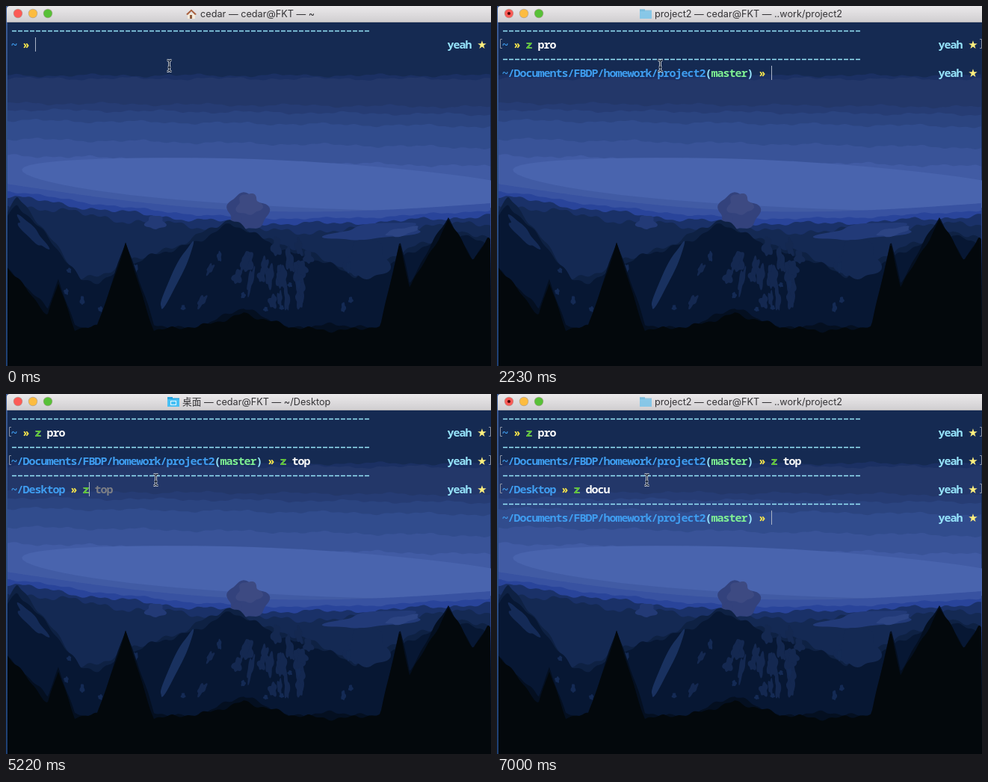
Recreate the animation shown at these times as an HTML page with a canvas. Size 649 by 482 pixels, loop 8 s.

```html
<!DOCTYPE html>
<html lang="en">
<head>
<meta charset="utf-8">
<title>Terminal directory jumping</title>
<style>
html, body { margin: 0; height: 100%; overflow: hidden; background: #03080c; }
canvas { display: block; }
</style>
</head>
<body>
<canvas id="stage" width="649" height="482"></canvas>
<script>
const LOOP = 8000, W = 649, H = 482, CELL = 8, LEFT = 7, ROW = 38;
const stage = document.getElementById('stage');
const wallpaper = new OffscreenCanvas(W, H);
let ctx = wallpaper.getContext('2d');

const BLUE = '#3f9df0', CYAN = '#97e5fc', YELLOW = '#fbe84c', GREEN = '#57c52d',
  MINT = '#7ff095', WHITE = '#fbfbfb', GRAY = '#7d7f85', STAR = '#fff07e';

// ---- drawing helpers -------------------------------------------------

function box(color, x, y, w, h) {
  ctx.fillStyle = color;
  ctx.fillRect(x, y, w, h);
}

function disc(color, x, y, r) {
  ctx.fillStyle = color;
  ctx.beginPath();
  ctx.arc(x, y, r, 0, 2 * Math.PI);
  ctx.fill();
}

function polygon(color, points) {
  ctx.fillStyle = color;
  ctx.beginPath();
  points.forEach(([x, y]) => ctx.lineTo(x, y));
  ctx.fill();
}

function gradient(height, from, to) {
  const g = ctx.createLinearGradient(0, 0, 0, height);
  g.addColorStop(0, from);
  g.addColorStop(1, to);
  return g;
}

// ---- wallpaper -------------------------------------------------------

let seed = 7;
function random(from, to) {
  seed = seed * 16807 % 2147483647;
  return from + (to - from) * seed / 2147483647;
}

const ripple = (x, phase) =>
  Math.sin(x * .05 + phase) + .7 * Math.sin(x * .13 + phase * 3) + .5 * Math.sin(x * .31 + phase * 5);

// Fills everything below the curve y = edge(x).
function below(color, edge) {
  const points = [[W, H], [0, H]];
  for (let x = 0; x <= W; x += 2) points.push([x, edge(x)]);
  polygon(color, points);
}

// A skyline of tent-shaped peaks, each given as [x, height, half width].
const skyline = (base, peaks, rough) => x =>
  base - Math.max(0, ...peaks.map(([px, h, w]) => h * (1 - Math.abs(x - px) / w))) + rough * ripple(x, base);

function blob(color, x, y, rx, ry, tilt = 0, rough = .12) {
  const points = [], phase = x + y;
  for (let a = 0; a < 2 * Math.PI; a += .1) {
    const r = 1 + rough * (Math.sin(3 * a + phase) + Math.sin(5 * a + 2 * phase));
    const u = rx * r * Math.cos(a), v = ry * r * Math.sin(a);
    points.push([x + u * Math.cos(tilt) - v * Math.sin(tilt), y + u * Math.sin(tilt) + v * Math.cos(tilt)]);
  }
  polygon(color, points);
}

function paintSky() {
  box('#152a52', 0, 0, W, H);
  const bands = [[93, '#1b3063'], [97, '#233769'], [130, '#263c74'], [139, '#2b4480'],
    [153, '#314c8d'], [178, '#395398'], [200, '#415ba4']];
  for (const [y, color] of bands)
    below(color, x => y + (y - 93) * .14 * x / W + 1.3 * ripple(x, y));
  blob('#4964ae', 370, 238, 345, 31, .05, .01);
}

function paintMountains() {
  const haze = [[238, '#3852a1'], [247, '#29449a'], [254, '#1a3168'], [264, '#142953']];
  haze.forEach(([y, color], i) =>
    below(color, x => y + 23 * Math.sin(Math.PI * x / W) + 26 * x / W + i * ripple(x, y)));
  blob('#233a76', 200, 290, 13, 9);
  blob('#223a78', 495, 302, 60, 10, -.1);
  blob('#2c4483', 530, 302, 22, 5, -.2);
  blob('#33427c', 322, 277, 27, 24, .2);
  blob('#33427c', 305, 298, 8, 20, .3);
  blob('#3d4a82', 325, 266, 16, 14);

  const valley = [[15, 103, 85], [300, 72, 175], [610, 63, 150]];
  below('#0e2143', skyline(361, valley, 3));
  below('#071733', skyline(366, valley, 3));
  blob('#142a56', 34, 303, 7, 28, -.75);
  blob('#142953', 483, 340, 28, 26);

  // Snow streaks lean away from the summit.
  blob('#19315f', 228, 361, 6, 49, .45, .05);
  for (let i = 0; i < 24; i++) {
    const x = random(262, 405), y = random(318, 402);
    blob('#142850', x, y, random(3, 8), random(7, 19), (365 - x) / 180, .16);
  }
  for (let i = 0; i < 16; i++) blob('#142a54', random(80, 500), random(335, 412), 3, random(3, 7));

  const trees = [[0, 82, 75], [70, 62, 22], [160, 114, 38], [318, 23, 60],
    [527, 115, 26], [592, 146, 85], [645, 120, 80]];
  below('#040f20', skyline(429, trees, 2.5));
  below('#03080c', skyline(432, trees, 2.5));
}

function paintWallpaper() {
  paintSky();
  paintMountains();
  box(gradient(H, '#3a5a94', '#1d3f72'), 0, 0, 2, H);
}

// ---- title bar -------------------------------------------------------

const USER = 'cedar@FKT';
const home = { icon: 'home', x: 241, text: `cedar — ${USER} — ~` };
const project = { icon: 'folder', x: 191, text: `project2 — ${USER} — ..work/project2` };
const desktop = { icon: 'desktop', x: 216, text: `桌面 — ${USER} — ~/Desktop` };

// The window counts as busy from `at` until `idle`.
const titles = [
  { at: 0, idle: 0, ...home },
  { at: 1930, idle: 0, ...home, x: 197, text: `cedar — ${USER} — ..work/project2` },
  { at: 2080, idle: 2370, ...project },
  { at: 4320, idle: 4470, ...desktop },
  { at: 6850, idle: LOOP, ...project }
];

function drawIcon(icon, x) {
  if (icon === 'home') {
    box('#f3eadb', x + 2, 10, 10, 7);
    box('#8d5b3d', x + 5, 12, 3, 5);
    polygon('#a85f3d', [[x, 11], [x + 7, 4.5], [x + 14, 11], [x + 12, 12], [x + 7, 7], [x + 2, 12]]);
    return;
  }
  const bright = icon === 'desktop';
  box(bright ? '#26a4e0' : '#66b5dc', x, 4, 7, 3);
  box(bright ? '#26a4e0' : '#66b5dc', x, 5.5, 16, 11.5);
  box(bright ? '#48c0f4' : '#84cbee', x, 7, 16, 10);
  if (bright) {
    ctx.strokeStyle = '#e6f7ff';
    ctx.lineWidth = 1;
    ctx.strokeRect(x + 4.5, 9.5, 7, 5);
  }
}

function drawTitleBar(t) {
  const { idle, icon, x, text } = titles.findLast(title => title.at <= t);
  const busy = t < idle;
  ctx.fillStyle = gradient(21, '#ebe9eb', '#d1cfd1');
  ctx.beginPath();
  ctx.roundRect(1, 0, W, 21, [4, 0, 0, 0]);
  ctx.fill();
  box('#b1b0b4', 1, 21, W, 1);

  ['#fc5b57', '#fdbc40', '#58c038'].forEach((color, i) => {
    disc('rgba(90,60,30,.35)', 16 + 20 * i, 10, 6.2);
    disc(color, 16 + 20 * i, 10, 5.6);
  });
  if (busy) disc('#4c0304', 16, 10, 2.1);

  ctx.globalAlpha = busy ? .65 : 1;
  drawIcon(icon, x);
  ctx.globalAlpha = 1;
  ctx.font = '12.7px Inter, "Noto Sans CJK SC", "Noto Sans CJK", sans-serif';
  ctx.textAlign = 'left';
  ctx.fillStyle = '#343336';
  ctx.fillText(text, x + (icon === 'home' ? 19 : 20), 15);
}

// ---- terminal --------------------------------------------------------

const repo = [['~/Documents/FBDP/homework/project2', BLUE], ['(', CYAN], ['master', MINT], [')', CYAN]];

// `keys` holds the moment each character of `command` appears;
// `hint` is the gray suggestion offered after the first one.
const rows = [
  { start: 0, mark: 1930, end: 1930, path: [['~', BLUE]],
    command: 'z pro', hint: ' folder', keys: [440, 890, 1030, 1030, 1180] },
  { start: 2230, mark: 4170, end: 4320, path: repo,
    command: 'z top', hint: ' pro', keys: [2970, 3120, 3720, 4020, 4020] },
  { start: 4320, mark: 6850, end: 6850, path: [['~/Desktop', BLUE]],
    command: 'z docu', hint: ' top', keys: [5220, 5670, 5960, 6110, 6110, 6560] },
  { start: 7000, mark: LOOP, end: LOOP, path: repo, command: '', hint: '', keys: [] }
];

// Writes one character per cell and returns the next free column.
function write(text, col, y, color) {
  ctx.fillStyle = color;
  for (const ch of text) ctx.fillText(ch, LEFT + CELL * (col++ + .5), y);
  return col;
}

const drawCursor = (x, top) => box('#a9b3c6', x, top, 1, 19);

function drawMarks(top) {
  ctx.strokeStyle = '#8a91a2';
  ctx.lineWidth = 1;
  ctx.beginPath();
  for (const [edge, tip] of [[4.5, 7], [648.5, 646]]) {
    ctx.moveTo(tip, top + 2.5);
    ctx.lineTo(edge, top + 2.5);
    ctx.lineTo(edge, top + 14.5);
    ctx.lineTo(tip, top + 14.5);
  }
  ctx.stroke();
}

function drawRule(y) {
  ctx.strokeStyle = CYAN;
  ctx.lineWidth = 1.4;
  ctx.setLineDash([6, 2]);
  ctx.beginPath();
  ctx.moveTo(LEFT + 1, y);
  ctx.lineTo(LEFT + 60 * CELL, y);
  ctx.stroke();
  ctx.setLineDash([]);
}

function drawRow(row, i, t) {
  const top = 42 + ROW * i, base = top + 15;
  if (t >= row.end && t < rows[i + 1].start) drawCursor(LEFT, top + 19);
  if (t < row.start) return;
  drawRule(top - 8.5);

  ctx.textAlign = 'center';
  ctx.font = '600 15px "Noto Sans Mono", monospace';
  let col = 0;
  for (const [text, color] of row.path) col = write(text, col, base, color);
  col = write(' » ', col, base, YELLOW);
  const count = row.keys.filter(at => at <= t).length;
  write(row.command.slice(0, count), col, base, WHITE);
  if (count) write(row.command[0], col, base, GREEN);
  col += count;
  if (count === 1 || count === 2) write(row.hint.slice(count - 1), col, base, GRAY);
  write('yeah', 73, base, CYAN);
  ctx.font = '15px "DejaVu Sans", sans-serif';
  ctx.fillStyle = STAR;
  ctx.fillText('★', 637, base);

  if (t >= row.mark) drawMarks(top);
  const blink = t >= 290 && t < 440;
  if (t < row.end && !blink) drawCursor(LEFT + CELL * col, top);
}

function drawPointer(t) {
  const [x, y] = t < 2370 ? [218.5, 80] : [200.5, t < 2520 ? 113 : 115];
  const beam = new Path2D('M-3-7.5Q0-7.5 0-5Q0-7.5 3-7.5M0-5V5M-3 7.5Q0 7.5 0 5Q0 7.5 3 7.5M-2 2H2');
  ctx.save();
  ctx.translate(x, y);
  for (const [color, width] of [['#e4e8ee', 3], ['#111c30', 1.3]]) {
    ctx.strokeStyle = color;
    ctx.lineWidth = width;
    ctx.stroke(beam);
  }
  ctx.restore();
}

function draw(now) {
  const t = now % LOOP;
  ctx.drawImage(wallpaper, 0, 0);
  drawTitleBar(t);
  rows.forEach((row, i) => drawRow(row, i, t));
  drawPointer(t);
  requestAnimationFrame(draw);
}

paintWallpaper();
ctx = stage.getContext('2d');
requestAnimationFrame(draw);
</script>
</body>
</html>
```
